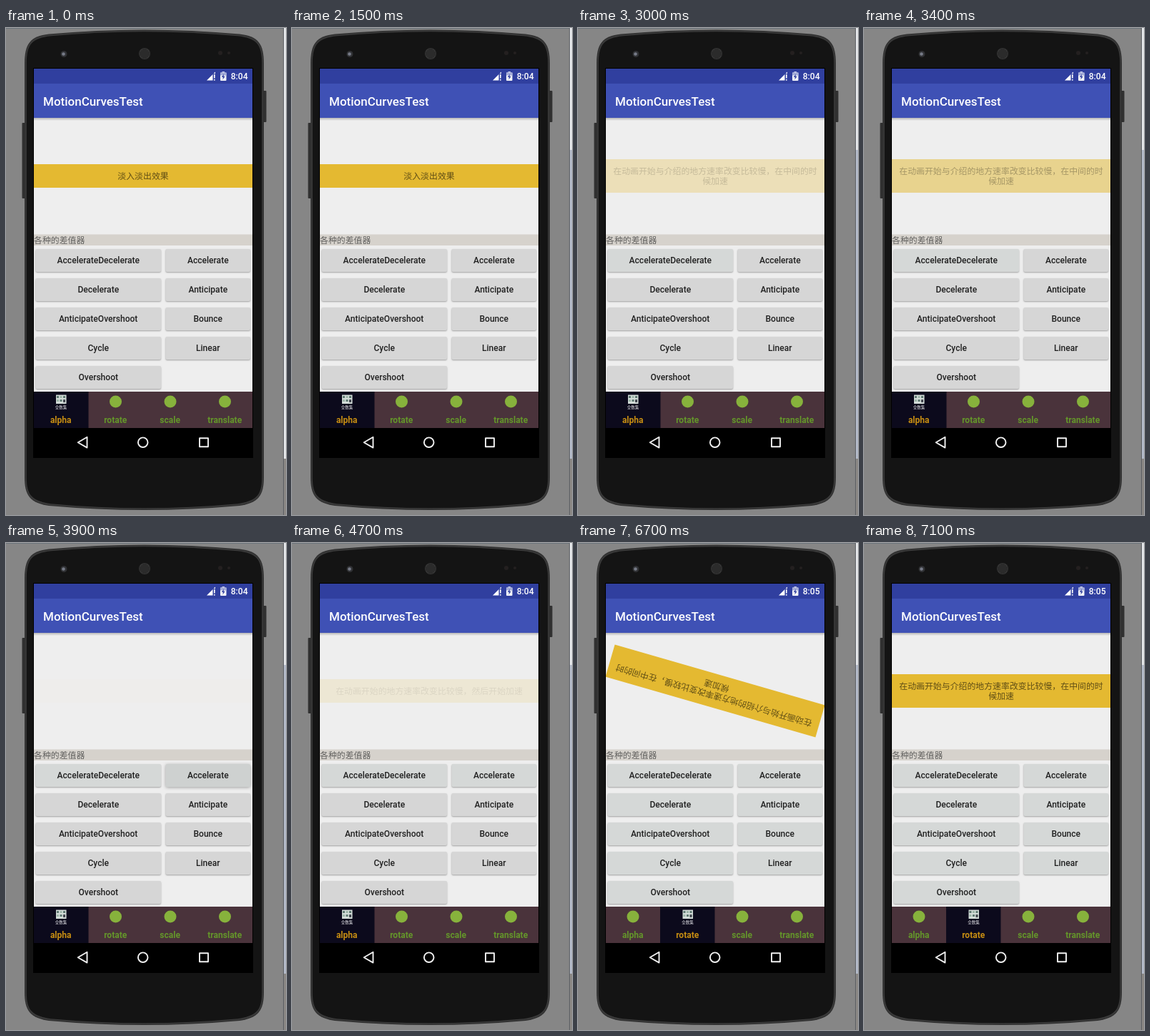
These frames come from a looping animation (392 px wide and 683 px high, 8000 ms). An HTML page with a canvas:

```html
<!DOCTYPE html>
<html lang="zh-CN">
<head>
<meta charset="utf-8">
<title>Interpolators</title>
<style>
html, body { margin: 0; width: 100%; height: 100%; overflow: hidden; background: #868686; }
canvas { display: block; width: 392px; height: 683px; }
</style>
</head>
<body>
<canvas id="stage"></canvas>
<script>
const W = 392, H = 683, LOOP = 8000;
const canvas = document.getElementById('stage');
const dpr = window.devicePixelRatio || 1;
canvas.width = W * dpr;
canvas.height = H * dpr;
const c = canvas.getContext('2d');

const LATIN = 'Roboto, sans-serif';
const CJK = '"Noto Sans CJK SC", "Noto Sans CJK", sans-serif';
const SLOW_ENDS = ['在动画开始与介绍的地方速率改变比较慢，在中间的时', '候加速'];
const SLOW_START = ['在动画开始的地方速率改变比较慢，然后开始加速'];

const range = (a, b) => Array.from({ length: (b - a) / 100 + 1 }, (_, i) => a + i * 100);
const TICKS = [0, 1500, ...range(1900, 2300), 2600, 2800, 3000, 3200, 3400,
  ...range(3600, 4100), 4700, 5200, 5300, ...range(6200, 7100)];
const hold = t => TICKS.filter(k => k <= t).pop();

const clamp = v => Math.max(0, Math.min(1, v));
const easeInOut = v => (1 - Math.cos(Math.PI * clamp(v))) / 2;
const easeIn = v => clamp(v) ** 2;

function rect(x, y, w, h, fill) {
  c.fillStyle = fill;
  c.fillRect(x, y, w, h);
}

function box(x, y, w, h, r, fill) {
  c.beginPath();
  c.roundRect(x, y, w, h, r);
  c.fillStyle = fill;
  c.fill();
}

function dot(x, y, r, fill) {
  c.beginPath();
  c.arc(x, y, r, 0, Math.PI * 2);
  c.fillStyle = fill;
  c.fill();
}

function poly(points, fill) {
  c.beginPath();
  points.forEach(([x, y]) => c.lineTo(x, y));
  c.closePath();
  c.fillStyle = fill;
  c.fill();
}

function text(str, x, y, font, fill, align = 'center') {
  c.font = font;
  c.textAlign = align;
  c.textBaseline = 'alphabetic';
  c.fillStyle = fill;
  c.fillText(str, x, y);
}

function body(d, fill) {
  const l = 26 + d, r = 361 - d, t = 2.5 + d, b = 676 - d;
  c.beginPath();
  c.moveTo(l, 50);
  c.bezierCurveTo(l, 22, l + 8, t + 9, l + 34, t + 6);
  c.quadraticCurveTo(193.5, t - 6, r - 34, t + 6);
  c.bezierCurveTo(r - 8, t + 9, r, 22, r, 50);
  c.lineTo(r, 630);
  c.bezierCurveTo(r, 656, r - 8, b - 10, r - 34, b - 6);
  c.quadraticCurveTo(193.5, b + 6, l + 34, b - 6);
  c.bezierCurveTo(l + 8, b - 10, l, 656, l, 630);
  c.closePath();
  c.fillStyle = fill;
  c.fill();
}

function drawPhone(t) {
  rect(0, 0, W, H, '#868686');
  rect(0, 0, W, 1, '#6c747b');
  rect(388, 0, 1, H, '#5c5f63');
  rect(389, 0, 3, H, '#e4e6e8');
  if (t >= 1500) rect(389, 171, 3, 433, '#b3bac9');
  rect(389, 604, 3, 79, '#8a8784');

  box(22.5, 133, 5, 106, 1, '#303030');
  box(359, 88, 5.5, 44, 1, '#303030');
  body(0, '#303030');
  body(1.2, '#3a3a3a');
  body(2.8, '#141414');

  dot(81, 36.5, 4.5, '#303134');
  dot(80.5, 36.5, 2.3, '#777b88');
  dot(194, 36, 8, '#353535');
  for (let y = -6; y <= 6; y += 2)
    for (let x = -6; x <= 6; x += 2)
      if (x * x + y * y < 46) rect(193.5 + x, 35.5 + y, 1, 1, '#111');
  dot(300, 35, 3, '#242020');
  dot(312, 35, 2, '#242020');
}

function drawBars(t) {
  rect(39, 57, 306, 21, '#303f9f');
  const sh = c.createLinearGradient(0, 126, 0, 130);
  sh.addColorStop(0, 'rgba(0,0,0,.24)');
  sh.addColorStop(1, 'rgba(0,0,0,0)');
  rect(39, 126, 306, 4, sh);
  rect(39, 78, 306, 48, '#3f51b5');
  text('MotionCurvesTest', 52, 108.5, '500 17px ' + LATIN, '#fff', 'left');
  text(t < 5200 ? '8:04' : '8:05', 338.5, 72, '500 12.1px ' + LATIN, '#fff', 'right');

  poly([[281, 73.5], [293, 61.5], [293, 73.5]], '#fff');
  rect(289.5, 64, 3.5, 10, '#303f9f');
  rect(291, 65, 1.6, 5.5, '#fff');
  rect(291, 72, 1.6, 1.6, '#fff');

  box(300, 62.5, 8.5, 11.5, 1, '#f2f3f8');
  rect(302.5, 61, 3.5, 2, '#c5cae9');
  rect(300, 62.5, 8.5, 4, '#a5add8');
  poly([[305, 64.5], [301.8, 69], [304, 69], [303.4, 72.5], [306.7, 67.8], [304.5, 67.8]], '#303f9f');
}

function banner(lines, alpha, turn) {
  const h = lines.length > 1 ? 47 : 33;
  c.save();
  c.beginPath();
  c.rect(39, 126, 306, 163.5);
  c.clip();
  c.globalAlpha = alpha;
  c.translate(192, 207.5);
  c.rotate(turn * Math.PI * 2);
  rect(-153, -h / 2, 306, h, '#e4b931');
  lines.forEach((line, i) => {
    const y = (i - (lines.length - 1) / 2) * 14 + 4.7;
    text(line, 0, y, '11.9px ' + CJK, 'rgba(0,0,0,.58)');
  });
  c.restore();
}

function drawBanner(t) {
  if (t < 1900) banner(['淡入淡出效果'], 1, 0);
  else if (t < 3600) banner(SLOW_ENDS, easeInOut((t - 2000) / 2800), 0);
  else if (t < 5200) banner(SLOW_START, easeIn((t - 3600) / 3000), 0);
  else if (t < 6300) banner(['旋转效果'], 1, 0);
  else banner(SLOW_ENDS, 1, easeInOut((t - 6330) / 700));
}

// Press highlight that fades out.
function ripple(t, start) {
  const v = (t - start) / 400;
  return v < 0 || v >= 1 ? 0 : 0.13 * (1 - v);
}

function button(label, col, row, tint, press) {
  const x = col ? 223.5 : 41.5, w = col ? 118.5 : 175.5, y = 310 + row * 41;
  c.save();
  c.shadowColor = 'rgba(0,0,0,.32)';
  c.shadowBlur = (press ? 4 : 2) * dpr;
  c.shadowOffsetY = dpr;
  box(x, y, w, 32, 2, tint ? '#d5d8d7' : '#d6d6d6');
  c.restore();
  if (press) box(x, y, w, 32, 2, `rgba(0,0,0,${press})`);
  text(label, x + w / 2, y + 20.4, '500 12.05px ' + LATIN, '#212121');
}

function drawButtons(t) {
  rect(39, 289.5, 306, 15.5, '#d6d2cc');
  text('各种的差值器', 39, 302, '11.9px ' + CJK, '#62615f', 'left');
  const late = t >= 5200;
  const firstPress = ripple(t, 1900) + ripple(t, 6300);
  button('AccelerateDecelerate', 0, 0, t >= 1900, firstPress);
  button('Accelerate', 1, 0, t >= 3600, ripple(t, 3600));
  const rest = ['Decelerate', 'Anticipate', 'AnticipateOvershoot', 'Bounce', 'Cycle', 'Linear', 'Overshoot'];
  rest.forEach((name, i) => button(name, i % 2, 1 + (i >> 1), late, 0));
}

function thumbnail(x) {
  rect(x - 7, 514.5, 14.5, 12.5, '#d3dcd8');
  for (let i = 0; i < 6; i++)
    rect(x - 6 + (i % 3) * 4.5, 516 + (i > 2) * 5, 3, 3, i % 2 ? '#9db5a8' : '#5f7a72');
  rect(x + 3, 521, 3, 4, '#42464f');
  text('全数集', x, 533.5, '500 5.5px ' + CJK, '#e6e6ea');
}

function drawTabs(t) {
  const active = t < 5200 ? 0 : 1;
  rect(39, 510, 306, 51, '#4a333b');
  rect(39 + active * 76, 510, 76.5, 51, '#0c0a1c');
  ['alpha', 'rotate', 'scale', 'translate'].forEach((name, i) => {
    const mid = 77 + i * 76.5, on = i === active;
    if (on) thumbnail(mid);
    else dot(mid, 524, 8.5, '#87b23c');
    text(name, mid - 0.3, 554, '700 12.05px ' + LATIN, on ? '#c68d12' : '#64962a');
  });
}

function drawNav() {
  rect(39, 561, 307, 41.5, '#000');
  c.strokeStyle = '#f2f2f2';
  c.lineWidth = 1.9;
  c.lineJoin = 'round';
  c.beginPath();
  c.moveTo(100.7, 581.2);
  c.lineTo(113.5, 573.8);
  c.lineTo(113.5, 588.6);
  c.closePath();
  c.stroke();
  c.beginPath();
  c.arc(191.7, 581.2, 6.8, 0, Math.PI * 2);
  c.stroke();
  c.strokeRect(271, 575.3, 12, 12);
}

function draw(time) {
  const t = hold(time);
  c.setTransform(dpr, 0, 0, dpr, 0, 0);
  drawPhone(t);
  rect(38, 56, 308, 547, '#000');
  rect(39, 57, 306, 504, '#eee');
  drawBanner(t);
  drawBars(t);
  drawButtons(t);
  drawTabs(t);
  drawNav();
}

const begin = performance.now();
function frame() {
  draw((performance.now() - begin) % LOOP);
  requestAnimationFrame(frame);
}
frame();
</script>
</body>
</html>
```
